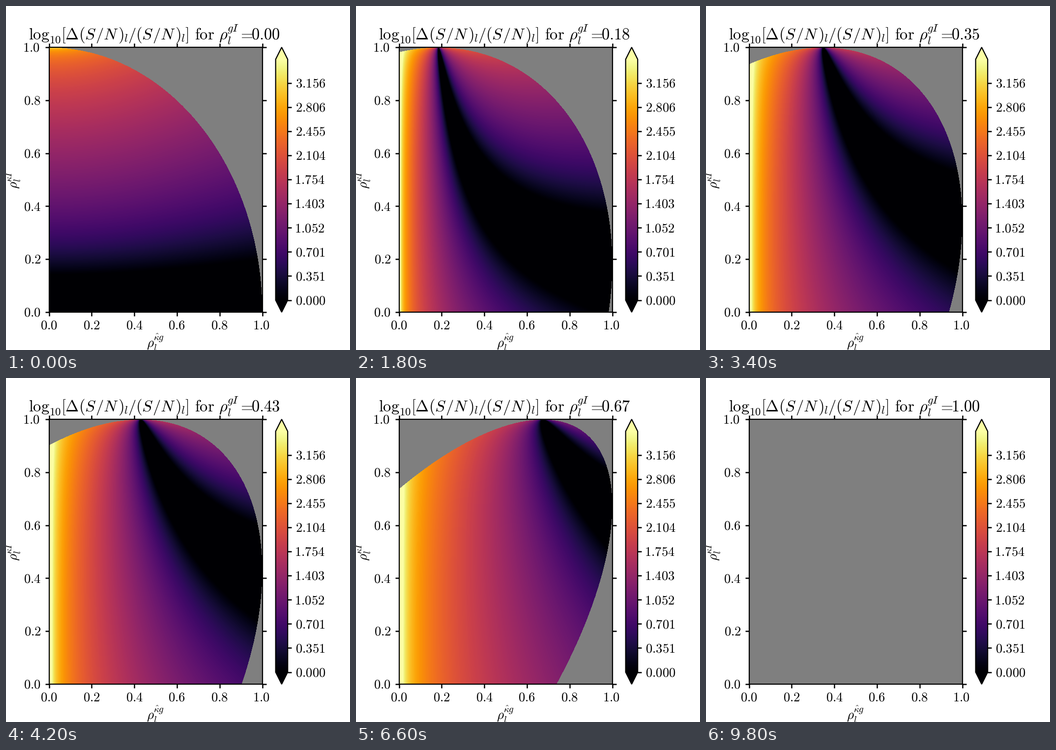
A matplotlib script for the animation above (10000 ms loop, 700 px wide and 700 px high).

```python
import numpy as np
import matplotlib.pyplot as plt
from matplotlib.animation import FuncAnimation

SIZE, DPI = 700, 100
FRAMES, INTERVAL = 50, 200
NX, NY = 434, 539
VMAX = 3.5
TICK_PT, LABEL_PT, TITLE_PT = 19.2, 19.5, 23.4
SCRIPT = 0.7
BASE = 68  # title baseline, px from the top

plt.rcParams["mathtext.fontset"] = "cm"

fig = plt.figure(figsize=(SIZE / DPI, SIZE / DPI), dpi=DPI, facecolor="white")


def add_axes(x, y, w, h):
    return fig.add_axes([x / SIZE, y / SIZE, w / SIZE, h / SIZE])


def put(x, y, tex, size, ha="left", rotation=0):
    """Place math text with its baseline at pixel (x, y), y downwards."""
    # Math images carry one pixel of padding on each side
    pad = {"left": 1, "center": 0, "right": -1}[ha]
    if rotation:
        y += pad
    else:
        x -= pad
    return fig.text(x / SIZE, 1 - y / SIZE, f"${tex}$", fontsize=size, ha=ha,
                    va="baseline", rotation=rotation, rotation_mode="anchor")


def put_number(x, y, s, ha):
    put(x - 2 * s.startswith("1"), y, s, TICK_PT, ha)


def put_rho(x, y, sup, size, up, down, rotation=0):
    """Draw rho with subscript l and a superscript; shifts are in em."""
    em = size * DPI / 72
    for along, rise, tex, scale in [(0, 0, r"\rho", 1),
                                    (0.52, up, sup, SCRIPT),
                                    (0.52, -down, "l", SCRIPT)]:
        dx, dy = along * em, -rise * em
        if rotation:
            dx, dy = dy, -dx
        put(x + dx, y + dy, tex, size * scale, rotation=rotation)


# Correlations of the two tracers with the lensing map
x, y = np.meshgrid((np.arange(NX) + 0.5) / NX, (np.arange(NY) + 0.5) / NY)
xc, yc = np.meshgrid(np.linspace(0, 1, NX + 1), np.linspace(0, 1, NY + 1))


def allowed_cells(r):
    """Cells whose four corners all give a positive determinant."""
    ok = 1 - xc**2 - yc**2 - r**2 + 2 * xc * yc * r > -1e-9
    ok &= r < 1
    return ok[:-1, :-1] & ok[1:, :-1] & ok[:-1, 1:] & ok[1:, 1:]


def gain_map(r):
    """log10 of the percent gain in S/N from adding the second spectrum."""
    allowed = allowed_cells(r)
    cross = 2 * x * y * r
    num = x**2 + r**2 - cross
    den = np.where(allowed, 1 + x**2 + r**2 - y**2 - cross, 1)
    ratio = np.maximum(num / den * (1 + x**2) / x**2, 0)
    gain = 100 * (np.sqrt(ratio) - 1)
    return np.ma.masked_where(~allowed, np.log10(np.maximum(gain, 1e-6)))


cmap = plt.get_cmap("inferno").copy()
cmap.set_bad("0.5")

ax = add_axes(87.5, 77, NX, NY)
image = ax.imshow(gain_map(0), cmap=cmap, vmin=0, vmax=VMAX, origin="lower",
                  extent=(0, 1, 0, 1), aspect="auto", interpolation="nearest")
steps = np.linspace(0, 1, 6)
ax.set_xticks(steps)
ax.set_yticks(steps)
ax.tick_params(top=True, right=True, labelbottom=False, labelleft=False,
               length=5.8, width=1.8)
for spine in ax.spines.values():
    spine.set_linewidth(1.6)
for v in steps:
    put_number(87.5 + NX * v, 657.5, f"{v:.1f}", "center")
    put_number(70.3, 631.8 - NY * v, f"{v:.1f}", "right")

bar = fig.colorbar(image, cax=add_axes(548.7, 77, 24.5, NY), extend="both")
levels = np.linspace(0, VMAX, 500)[::50]
bar.set_ticks(levels, labels=[""] * len(levels))
bar.ax.tick_params(length=5.8, width=1.8)
bar.outline.set_linewidth(1.6)
for v in levels:
    put_number(589.7, 607.3 - 490 * v / VMAX, f"{v:.3f}", "left")

put_rho(286.5, 694, r"\hat{\kappa} g", LABEL_PT, 0.474, 0.279)
put_rho(22.5, 371.5, r"\hat{\kappa} I", LABEL_PT, 0.363, 0.26, rotation=90)

# Title: log10[D(S/N)_l/(S/N)_l] for rho_l^gI = value
SN = r"(S\hspace{0.066}/N\hspace{0.124})"
for px, tex in [(47.2, r"\mathrm{log}"), (112.5, r"[\Delta" + SN),
                (248.7, "/" + SN), (365.2, "]"), (384.7, r"\mathrm{for}")]:
    put(px, BASE, tex, TITLE_PT)
put(88.5, BASE + 7.6, "10", TITLE_PT * SCRIPT)
for px in (240.7, 357.2):
    put(px, BASE + 5, "l", TITLE_PT * SCRIPT)
put_rho(434, BASE, "gI", TITLE_PT, 0.479, 0.298)
put(488, BASE, "=", TITLE_PT, "center")
value = put(500.5, BASE, "0.00", TITLE_PT)


def update(i):
    r = i / (FRAMES - 1)
    image.set_data(gain_map(r))
    value.set_text(f"${r:.2f}$")
    return image, value


anim = FuncAnimation(fig, update, frames=FRAMES, interval=INTERVAL,
                     init_func=lambda: update(0), repeat=True, repeat_delay=0,
                     blit=False)
plt.show()
```
